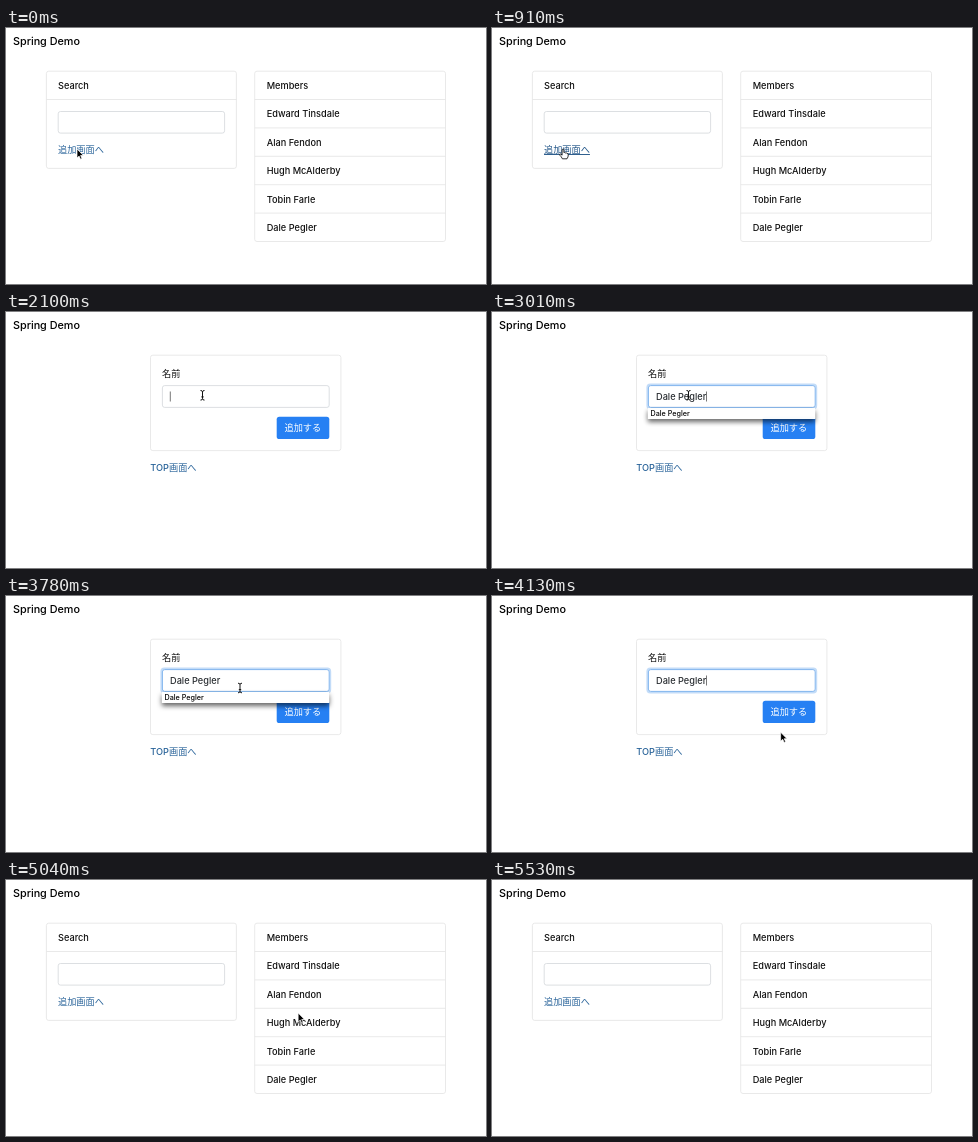
An HTML page that plays this animation: 480x256 px, repeating every 6.3 s.

```html
<!DOCTYPE html>
<html lang="ja">
<head>
<meta charset="utf-8">
<title>Spring Demo</title>
<style>
  html, body { margin: 0; width: 100%; height: 100%; overflow: hidden; background: #fff; }
  svg { display: block; width: 480px; height: 256px; }
  text { font: 500 9.2px Inter, "Noto Sans CJK JP", "Noto Sans CJK", sans-serif; fill: #111; }
  .brand { font-size: 10.8px; fill: #000; }
  .card, .rule { fill: none; stroke: #e4e4e4; stroke-width: .8; }
  .input { fill: #fff; stroke: #d3d7db; stroke-width: .8; }
  .link { fill: #2a649a; }
  .hover { fill: #1f5386; text-decoration: underline; }
  .focus { stroke: #80b4ee; stroke-width: 1; }
  #ring { fill: none; stroke: #c3dcf8; stroke-width: 1.8; }
  #button { fill: #2680f3; }
  #button.hover { fill: #1f73e4; }
  .label { fill: #fff; }
  #value { fill: #2b2f33; }
  #caret { stroke: #555; stroke-width: .8; }
  #menu rect { fill: #fff; filter: drop-shadow(0 3px 2.5px rgba(0, 0, 0, .6)); }
  #menu text { font-size: 7.2px; fill: #000; }
  #arrow { fill: #000; stroke: #fff; stroke-width: .7; }
  #hand { fill: #fff; stroke: #000; stroke-width: .8; stroke-linejoin: round; }
  #beam { fill: none; stroke: #111; stroke-width: 1; }
</style>
</head>
<body>
<svg viewBox="0 0 480 256">
  <text class="brand" x="7" y="17">Spring Demo</text>

  <g id="top">
    <rect class="card" x="40.4" y="43.2" width="190" height="97.2" rx="2.3"/>
    <path class="rule" d="M40.4 71.5h190"/>
    <text x="52" y="61">Search</text>
    <rect class="input" x="52.2" y="83.5" width="166.4" height="21.6" rx="2.3"/>
    <text id="addLink" class="link" x="52" y="125">追加画面へ</text>
    <rect class="card" x="248.7" y="43.2" width="190.8" height="170.3" rx="2.3"/>
    <g id="members"></g>
  </g>

  <g id="form">
    <rect class="card" x="144.5" y="43.2" width="190.4" height="95.4" rx="2.3"/>
    <text x="156" y="65">名前</text>
    <rect id="ring" x="155.3" y="72.5" width="169" height="24" rx="3"/>
    <rect id="field" class="input" x="156.4" y="73.6" width="166.8" height="21.8" rx="2.3"/>
    <text id="value" x="164" y="88"></text>
    <path id="caret" d="M0 79.5v10"/>
    <rect id="button" x="270.7" y="104.7" width="52.6" height="22.4" rx="2.6"/>
    <text class="label" x="278.5" y="119.2">追加する</text>
    <text class="link" x="144.3" y="158.6">TOP画面へ</text>
    <g id="menu">
      <rect x="155.8" y="96" width="167.4" height="11"/>
      <text x="158.5" y="104"></text>
    </g>
  </g>

  <g id="cursor">
    <path id="arrow" d="M0 0V9L2.1 7.1L3.5 10.2L5 9.5L3.6 6.5H6.4Z"/>
    <path id="hand" d="M-.9 .6Q0 -.6 .9 .6V3.6Q2 2.8 2.6 4Q3.8 3.4 4.2 4.6Q5.4 4.4 5.3 5.8Q5.3 8 4 9.8H-.6Q-1.6 7.6 -3.2 6.2Q-3.6 4.8 -2.3 5L-.9 6.2Z"/>
    <path id="beam" d="M-2 -4.8Q0 -4.8 0 -3.4Q0 -4.8 2 -4.8M0 -3.4V3.4M-2 4.8Q0 4.8 0 3.4Q0 4.8 2 4.8M-1.2 1.6H1.2"/>
  </g>
</svg>

<script>
const LOOP = 6300, STEP = 70;
const FORM_OPENS = 1400, FORM_SENT = 4970;
const NAME = "Dale Pegler";
const MEMBERS = ["Edward Tinsdale", "Alan Fendon", "Hugh McAlderby", "Tobin Farle", NAME];

// Pointer stops: time, x, y
const PATH = [
  [0, 71, 121], [1330, 71, 121], [1400, 88, 115], [2030, 196.5, 83.3],
  [3220, 196.5, 83.3], [3780, 234, 92], [3920, 265, 99.5], [4200, 293, 143],
  [4340, 293, 143], [4690, 291, 114], [4900, 291, 114], [5530, 300, 264]
];
// Typed characters from each time on
const TYPING = [[2660, 2], [2730, 4], [2940, 8], [3010, NAME.length]];

const $ = id => document.getElementById(id);
const show = (id, on) => $(id).style.display = on ? "" : "none";
const within = (t, from, to) => t >= from && t < to;
const ease = k => k * k * (3 - 2 * k);

$("members").innerHTML = ["Members", ...MEMBERS].map((name, i) =>
  `<text x="260.7" y="${61 + 28.4 * i}">${name}</text>` +
  (i ? `<path class="rule" d="M248.7 ${43.1 + 28.4 * i}h190.8"/>` : "")).join("");
document.querySelector("#menu text").textContent = NAME;

function pointerAt(t) {
  const next = PATH.findIndex(stop => stop[0] > t);
  if (next < 0) return PATH.at(-1).slice(1);
  const [t0, x0, y0] = PATH[next - 1], [t1, x1, y1] = PATH[next];
  const k = ease((t - t0) / (t1 - t0));
  return [x0 + (x1 - x0) * k, y0 + (y1 - y0) * k];
}

function render(time) {
  const t = Math.floor(time % LOOP / STEP) * STEP;
  const [x, y] = pointerAt(t);
  const inside = (x0, y0, x1, y1) => within(x, x0, x1) && within(y, y0, y1);

  const onForm = within(t, FORM_OPENS, FORM_SENT);
  const menuOpen = within(t, 2940, 4130);
  const focused = t >= 2240;
  const onMenu = menuOpen && inside(156, 96, 323, 107);
  const onField = onForm && !onMenu && inside(156, 73, 323, 96);
  const onButton = onForm && !onMenu && inside(271, 105, 323, 127);
  const onLink = within(t, 280, FORM_OPENS);

  show("top", !onForm);
  show("form", onForm);
  $("addLink").classList.toggle("hover", within(t, 420, FORM_OPENS));
  $("field").classList.toggle("focus", focused);
  show("ring", focused);
  $("button").classList.toggle("hover", onButton);

  const typed = TYPING.reduce((count, [from, n]) => t >= from ? n : count, 0);
  $("value").textContent = NAME.slice(0, typed);
  const caretX = 164.3 + (onForm && typed ? $("value").getComputedTextLength() : 0);
  $("caret").setAttribute("transform", `translate(${caretX})`);
  show("caret", within(t, 2100, 3570) || within(t, 4060, 4480));
  show("menu", menuOpen);
  $("menu").style.opacity = Math.min(1, .7 + (t - 2940) / 250);

  $("cursor").setAttribute("transform", `translate(${x} ${y})`);
  show("beam", onField);
  show("hand", onButton || onLink);
  show("arrow", !onField && !onButton && !onLink);
}

let start;
function frame(now) {
  start ??= now;
  render(now - start);
  requestAnimationFrame(frame);
}
render(0);
requestAnimationFrame(frame);
</script>
</body>
</html>
```
